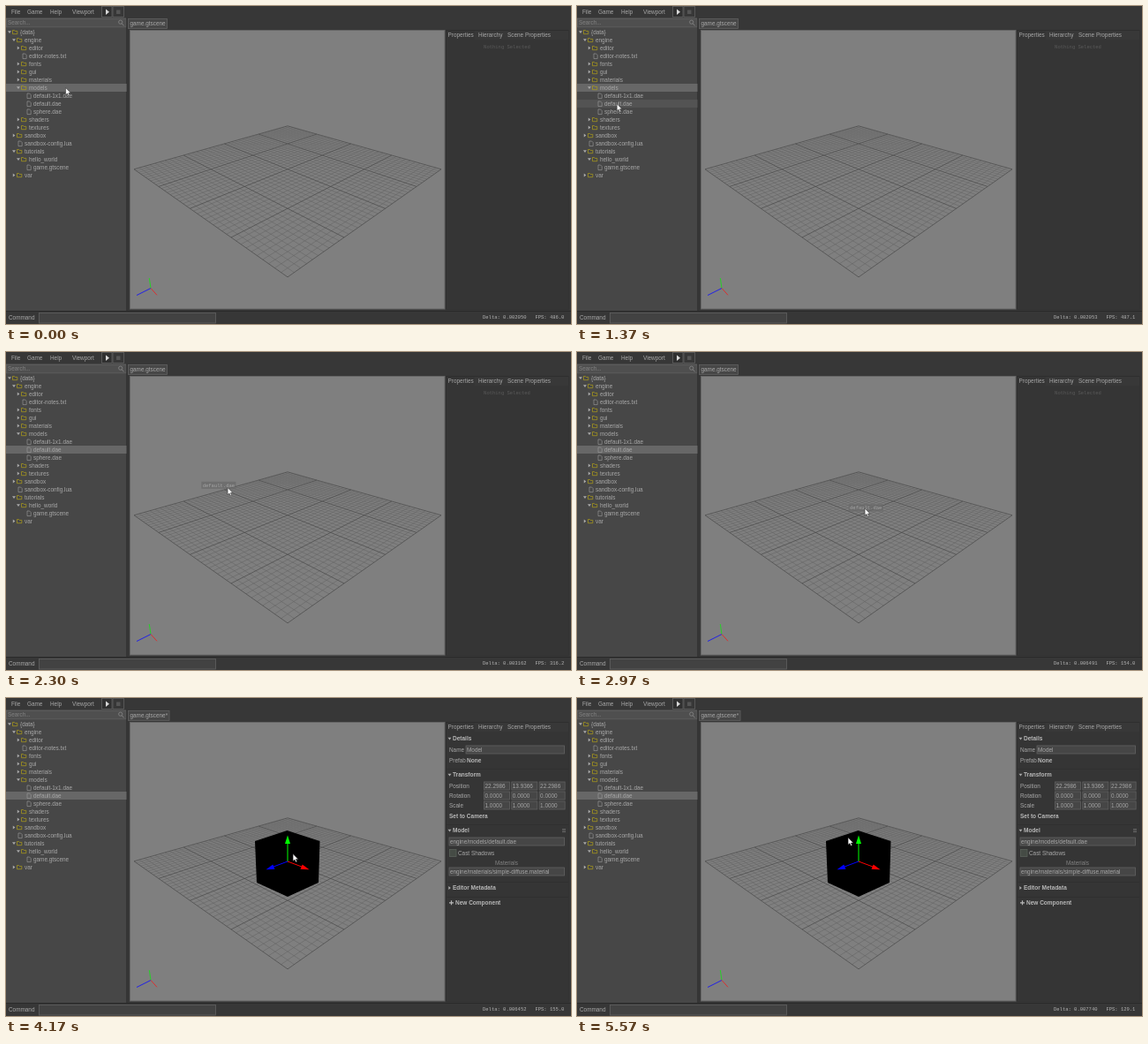
Write an HTML page that moves like this. It is 640x360 px and loops after 5.63 s.

```html
<!DOCTYPE html>
<html lang="en">
<head>
<meta charset="utf-8">
<title>Scene editor</title>
<style>
html, body { margin: 0; width: 100%; height: 100%; overflow: hidden; background: #373737; }
svg { display: block; width: 640px; height: 360px; }
text { font: 6.4px "Liberation Sans", Arial, sans-serif; fill: #a8a8a8; white-space: pre; }
.bold { font-weight: bold; font-size: 6.5px; fill: #b8b8b8; }
.mono { font: 5.5px "Liberation Mono", monospace; fill: #b4b4b4; }
.dim { fill: #828282; }
.field { fill: #464646; stroke: #606060; stroke-width: .8; }
</style>
</head>
<body>
<svg id="stage" viewBox="0 0 640 360"></svg>
<script>
const LOOP = 5630, STEP = 1000 / 15;
const ROW_TOP = 25, ROW_HEIGHT = 9, TREE_WIDTH = 136.5;
const DRAG_START = 1820, DROP = 3295, PANEL_SHOWN = 3425;
const BORDER = 'stroke="#606060" stroke-width=".8"';

const rect = (x, y, w, h, fill, extra = '') =>
  `<rect x="${x}" y="${y}" width="${w}" height="${h}" fill="${fill}" ${extra}/>`;
const path = (d, fill = 'none', stroke = 'none', width = 1) =>
  `<path d="${d}" fill="${fill}" stroke="${stroke}" stroke-width="${width}"/>`;
const text = (x, y, label, cls = '', extra = '') =>
  `<text x="${x}" y="${y}" class="${cls}" ${extra}>${label}</text>`;
const field = (x, y, w, value) =>
  `<rect class="field" x="${x + .5}" y="${y + .5}" width="${w - 1}" height="9"/>` + text(x + 1.5, y + 7.2, value);
const arrow = (x, y, open) => path(open
  ? `M${x - 2} ${y - 1.2}h4l-2 2.6z`
  : `M${x - 1.2} ${y - 2}v4l2.6 -2z`, '#a8a8a8');

// Tree rows: depth, kind (o open folder, c closed folder, f file), name
const rows = [
  '0o{data}', '1oengine', '2ceditor', '2feditor-notes.txt', '2cfonts', '2cgui', '2cmaterials',
  '2omodels', '3fdefault-1x1.dae', '3fdefault.dae', '3fsphere.dae', '2cshaders', '2ctextures',
  '1csandbox', '1fsandbox-config.lua', '1otutorials', '2ohello_world', '3fgame.gtscene', '1cvar'
];

function treeRow(row, i) {
  const indent = 5 * row[0], kind = row[1], y = ROW_TOP + ROW_HEIGHT * i + 4.5;
  const icon = kind === 'f'
    ? path(`M${indent + 9} ${y - 2.5}h2.6l1.6 1.6v4h-4.2z`, 'none', '#a0a0a0', .6)
    : arrow(indent + 4, y, kind === 'o') +
      path(`M${indent + 7.5} ${y + 2.2}v-4.2h2l.8 .9h2.5v3.3z`, 'none', '#b0a018', .7);
  return icon + text(indent + 16, y + 2.2, row.slice(2));
}

// Ground plane: u and v run from -1 to 1, the near corner is (1, 1)
function project(u, v) {
  const w = 1 - .427 * (u + v) / 2;
  return `${(319 + 174 * (u - v) / 2 / w).toFixed(2)} ${(21 + 163.8 / w).toFixed(2)}`;
}

function grid() {
  const half = 20;
  let minor = '', major = '';
  for (let i = -half; i <= half; i++) {
    const k = i / half;
    const lines = `M${project(k, -1)}L${project(k, 1)}M${project(-1, k)}L${project(1, k)}`;
    if (i % 10) minor += lines; else major += lines;
  }
  return path(minor, 'none', '#606060', .5) + path(major, 'none', '#484848', .7);
}

function chrome() {
  const axis = (x, y, color) => path(`M164 319.5L${x} ${y}`, 'none', color, 1);
  return rect(0, 0, 640, 360, '#373737') +
    [[6, 'File'], [24, 'Game'], [50, 'Help'], [75, 'Viewport']].map(([x, s]) => text(x, 9.2, s)).join('') +
    rect(108.5, .5, 11.5, 12, '#303030', BORDER) + path('M113 3.5v6.4l4 -3.2z', '#d8d8d8') +
    rect(121, .5, 12.5, 12, '#373737', BORDER) + rect(125, 4.5, 4.5, 4.5, '#555') +
    rect(0, 13, 136.5, 332, '#474747') + rect(.4, 14.4, 135.6, 9.4, '#4f4f4f', BORDER) +
    text(2, 21.2, 'Search...', 'dim') +
    '<circle cx="129.7" cy="18.2" r="2.1" fill="none" stroke="#828282" stroke-width=".9"/>' +
    path('M131.2 19.8l2.4 2.6', 'none', '#828282', 1) +
    rect(136.5, 13, .7, 332, '#2c2c2c') +
    rect(140.5, 27.5, 356.5, 315.5, '#7f7f7f', 'stroke="#646464"') + grid() +
    axis(162.3, 308, '#28d028') + axis(148, 327.5, '#2020e8') + axis(171, 327.3, '#dc3030') +
    rect(498, 27, 139.5, 316.5, '#2e2e2e') + rect(499, 38, 138, 305, '#353535') +
    rect(499, 28, 138, 10, '#383838') + rect(499, 28, 32, 11, '#353535') +
    text(500.5, 35.2, 'Properties') + text(535, 35.2, 'Hierarchy') + text(568, 35.2, 'Scene Properties') +
    rect(0, 345, 640, 1, '#2a2a2a') +
    text(3, 354.7, 'Command') + rect(37.5, 347.5, 200, 11.5, '#424242', BORDER);
}

function model() {
  const axis = (line, cone, color) => path('M319 185' + line, 'none', color, 1) + path(cone, color);
  return path('M318.5 150L355.5 162 354 209 319 225 284 209 282 162z', '#000') +
    axis('V164', 'M319 155.5l3 9.5h-6z', '#00ff00') +
    axis('L335 191', 'M343.5 194.2l-10 -.4 2.2 -5.4z', '#ff0000') +
    axis('L303 191', 'M294.5 194.2l10 -.4 -2.2 -5.4z', '#0000ff');
}

function properties() {
  const section = (y, label, open) => arrow(502.5, y, open) + text(506, y + 2.3, label, 'bold');
  const vector = (y, label, values) => text(502, y + 2.2, label) +
    values.map((v, i) => field(541 + 31.3 * i, y - 5, 30, v)).join('');
  const zero = Array(3).fill('0.0000'), one = Array(3).fill('1.0000');
  return [80, 143, 208, 225].map(y => rect(499, y, 138, .7, '#2e2e2e')).join('') +
    section(46, 'Details', true) + text(502, 60.7, 'Name') + field(520.5, 53.5, 112.5, 'Model') +
    text(502, 73.2, 'Prefab') + text(522, 73.2, 'None', 'bold') +
    section(87, 'Transform', true) +
    vector(99.5, 'Position', ['22.2986', '13.9366', '22.2986']) +
    vector(110.5, 'Rotation', zero) + vector(121.5, 'Scale', one) +
    text(502, 136, 'Set to Camera', 'bold') +
    section(150, 'Model', true) + path('M630 148.5h4m-4 1.6h4m-4 1.6h4', 'none', '#777', .7) +
    field(501.5, 157.5, 131.5, 'engine/models/default.dae') +
    rect(502.5, 171.5, 7.5, 8, '#454b45', 'stroke="#596059" stroke-width=".8"') + text(512, 177.7, 'Cast Shadows') +
    text(567, 189, 'Materials', 'dim', 'text-anchor="middle"') +
    field(501.5, 191.5, 131.5, 'engine/materials/simple-diffuse.material') +
    section(215, 'Editor Metadata', false) +
    path('M502 231.8h5m-2.5 -2.5v5', 'none', '#b8b8b8', 1.2) + text(509, 234.2, 'New Component', 'bold');
}

document.getElementById('stage').innerHTML = chrome() +
  rect(138.5, 14.5, 0, 11, '#474747', `id="tab" ${BORDER}`) + text(140.5, 21.7, '', '', 'id="tabName"') +
  rect(0, 0, TREE_WIDTH, ROW_HEIGHT, '#535353', 'id="hover"') +
  rect(0, 0, TREE_WIDTH, ROW_HEIGHT, '#676767', 'id="selection"') +
  rows.map(treeRow).join('') +
  text(567.5, 47.5, 'Nothing Selected', 'mono', 'id="empty" text-anchor="middle" style="fill:#5a5a5a"') +
  `<g id="model">${model()}</g><g id="panel">${properties()}</g>` +
  text(540, 354.4, '', 'mono', 'id="stats"') +
  `<g id="dragLabel">${rect(-19.5, -4, 39, 8, '#686868', 'opacity=".7"')}` +
  text(0, 1.8, 'default.dae', 'mono', 'text-anchor="middle" style="fill:#a6a6a6"') + '</g>' +
  '<path id="cursor" d="M.6 .6V8.6L2.5 7 3.8 9.8 5.1 9.2 3.9 6.5H6.4Z" fill="#fff" stroke="#222" stroke-width=".5"/>';

const part = Object.fromEntries([...document.querySelectorAll('[id]')].map(e => [e.id, e]));
const show = (el, on) => el.style.display = on ? '' : 'none';
const move = (el, x, y) => el.setAttribute('transform', `translate(${x} ${y})`);

// Pointer path: time, x, y
const pointer = [
  [0, 67, 92], [767, 67, 92], [967, 62, 99], [1200, 52, 106], [1367, 44.6, 110.2], [1433, 44, 110.5],
  [1767, 44, 110.5], [1900, 51, 112.5], [2033, 76, 118], [2100, 100, 122], [2167, 142, 132],
  [2300, 250.5, 153], [2367, 282, 162], [2500, 311, 172], [2700, 323.5, 175.5], [2967, 325.5, 176.5],
  [4100, 325.5, 176.5], [4167, 324.5, 176], [4400, 316, 167], [4633, 306.5, 157.5], [LOOP, 306.5, 157.5]
];

function pointerAt(t) {
  const i = Math.max(1, pointer.findIndex(p => p[0] >= t));
  const [t0, x0, y0] = pointer[i - 1], [t1, x1, y1] = pointer[i];
  const k = Math.max(0, (t - t0) / (t1 - t0));
  return [x0 + (x1 - x0) * k, y0 + (y1 - y0) * k];
}

// Refreshed once per second: frame time, rate
const stats = [
  ['0.002050', '486.0'], ['0.002053', '487.1'], ['0.003162', '316.2'],
  ['0.006491', '154.0'], ['0.006452', '155.0'], ['0.006618', '151.1'], ['0.007740', '129.1']
];

function draw(now) {
  const time = now % LOOP;
  const t = Math.max(0, Math.floor((time + 37.4) / STEP) * STEP - STEP / 2);
  const [x, y] = pointerAt(t);
  move(part.cursor, x, y);

  const row = Math.floor((y - ROW_TOP) / ROW_HEIGHT);
  show(part.hover, x < TREE_WIDTH);
  move(part.hover, 0, ROW_TOP + ROW_HEIGHT * row);
  move(part.selection, 0, ROW_TOP + ROW_HEIGHT * (t < 1695 ? 7 : 9));

  const dragging = t >= DRAG_START && t < DROP;
  show(part.dragLabel, dragging);
  if (dragging) {
    const [labelX, labelY] = pointerAt(t - 14);
    move(part.dragLabel, labelX + 1.8, labelY);
  }

  const dropped = t >= DROP, filled = t >= PANEL_SHOWN;
  part.tab.setAttribute('width', dropped ? 46.5 : 44);
  part.tabName.textContent = 'game.gtscene' + (dropped ? '*' : '');
  show(part.model, dropped);
  show(part.panel, filled);
  show(part.empty, !filled);

  const [delta, fps] = stats[Math.floor((t + 434) / 1000)];
  part.stats.textContent = `Delta: ${delta}   FPS: ${fps}`;
}

let start;
function tick(now) {
  start ??= now;
  draw(now - start);
  requestAnimationFrame(tick);
}
draw(0);
requestAnimationFrame(tick);
</script>
</body>
</html>
```
